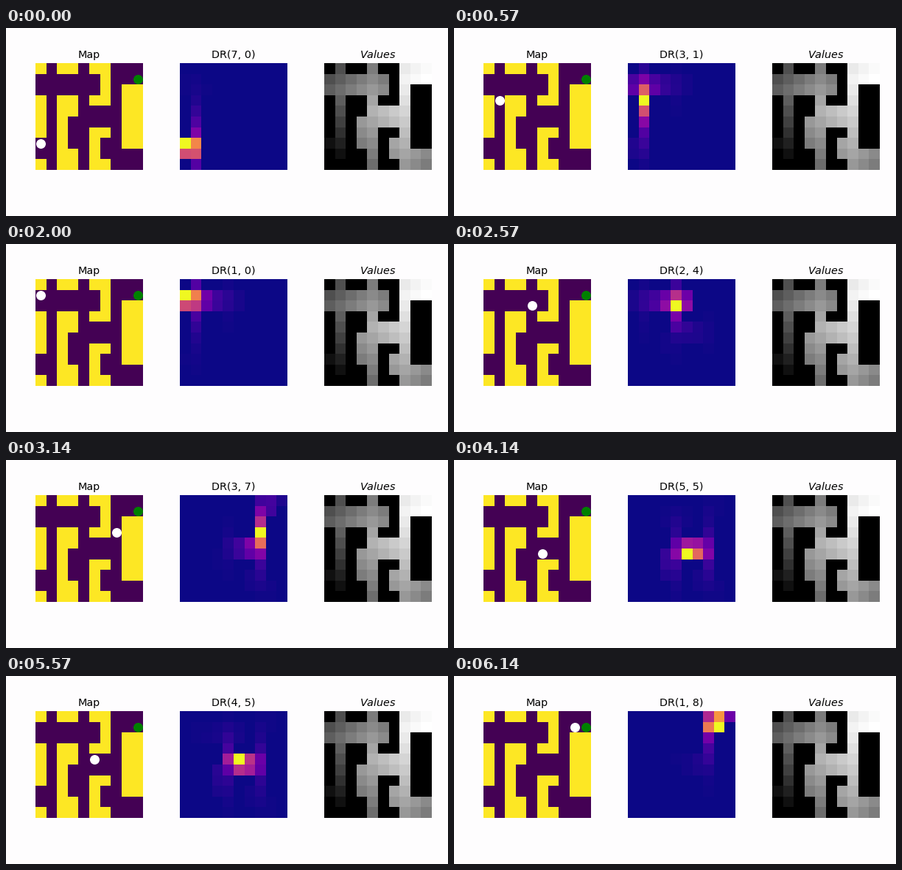
Animation, 600 px wide and 257 px high, one loop 6.28 s. Source, as a matplotlib script:

```python
import numpy as np
import matplotlib.pyplot as plt
from matplotlib.animation import FuncAnimation

W, H, DPI = 600, 257, 64
PX = 72 / DPI  # points per pixel
FRAMES, LOOP_MS = 44, 6280
DISCOUNT = 0.83
GOAL = (1, 9)

MAZE = """
#.##.##...
......#...
......#.##
#.##.##.##
#.##....##
#.#.....##
#.#..##.##
..#..#..##
..##.#....
#.##.##...
""".split()
N = len(MAZE)
walls = np.array([[c == "#" for c in row] for row in MAZE])
cells = [(r, c) for r in range(N) for c in range(N) if not walls[r, c]]
index = {cell: i for i, cell in enumerate(cells)}

# Learned step preferences; every other cell moves uniformly.
BIAS = {
    (7, 0): {(7, 1): 0.55, (8, 0): 0.45},
    (4, 4): {(3, 4): 0.33, (4, 5): 0.48, (5, 4): 0.19},
    (5, 5): {(4, 5): 0.22, (5, 6): 0.55, (5, 4): 0.23},
    (3, 7): {(2, 7): 0.41, (4, 7): 0.59},
}


def neighbours(cell):
    """Open neighbours in the order east, north, south, west."""
    r, c = cell
    around = [(r, c + 1), (r - 1, c), (r + 1, c), (r, c - 1)]
    return [n for n in around if n in index]


def goal_distances():
    dist, queue = {GOAL: 0}, [GOAL]
    for cell in queue:
        for n in neighbours(cell):
            if n not in dist:
                dist[n] = dist[cell] + 1
                queue.append(n)
    return dist


def representation():
    step = np.zeros((len(cells), len(cells)))
    for cell in cells:
        if cell == GOAL:
            continue
        options = [n for n in neighbours(cell) if n != GOAL]
        for n in options:
            weight = BIAS.get(cell, {}).get(n, 1 / len(options))
            step[index[cell], index[n]] = weight
    return np.linalg.inv(np.eye(len(cells)) - DISCOUNT * step)


def walk(start):
    """Greedy path from start to the goal."""
    path = [start]
    while path[-1] != GOAL:
        path.append(min(neighbours(path[-1]), key=dist.get))
    return path


def dr_image(cell):
    img = np.zeros((N, N))
    row = M[index[cell]]
    for other, v in zip(cells, row / row.max()):
        img[other] = v
    return img


dist = goal_distances()
M = representation()
route = [p for s in [(7, 0), (1, 0), (9, 4), (0, 4)] for p in walk(s)]

values = np.zeros((N, N))
for cell, d in dist.items():
    values[cell] = 1 - (d / max(dist.values())) ** 1.3

fig = plt.figure(figsize=(W / DPI, H / DPI), dpi=DPI, facecolor="#fefdfe")


def panel(left, data, cmap, title):
    size = 146
    ax = fig.add_axes([left / W, 1 - (48 + size) / H, size / W, size / H])
    ax.axis("off")
    img = ax.imshow(data, cmap=cmap, vmin=0, vmax=1,
                    interpolation="nearest", aspect="auto")
    label = ax.set_title(title, fontsize=14.4 * PX, pad=7.2 * PX)
    return ax, img, label


def dot(ax, cell, color):
    return ax.plot([cell[1]], [cell[0]], "o", color=color,
                   markersize=13 * PX, markeredgewidth=0)[0]


plt.rcParams["font.family"] = "DejaVu Sans"
map_ax, _, _ = panel(40, walls.astype(float), "viridis", "Map")
_, dr_img, dr_title = panel(236, np.zeros((N, N)), "plasma", "")
panel(432, values, "gray", "$Values$")
dot(map_ax, GOAL, "green")
agent = dot(map_ax, route[0], "white")


def draw(frame):
    # The walk takes ten steps for every seven frames.
    cell = route[frame * 10 // 7]
    agent.set_data([cell[1]], [cell[0]])
    dr_img.set_data(dr_image(cell))
    dr_title.set_text(f"DR({cell[0]}, {cell[1]})")
    return agent, dr_img, dr_title


anim = FuncAnimation(fig, draw, frames=FRAMES, interval=LOOP_MS / FRAMES,
                     repeat=True, repeat_delay=0, blit=False)
plt.show()
```
